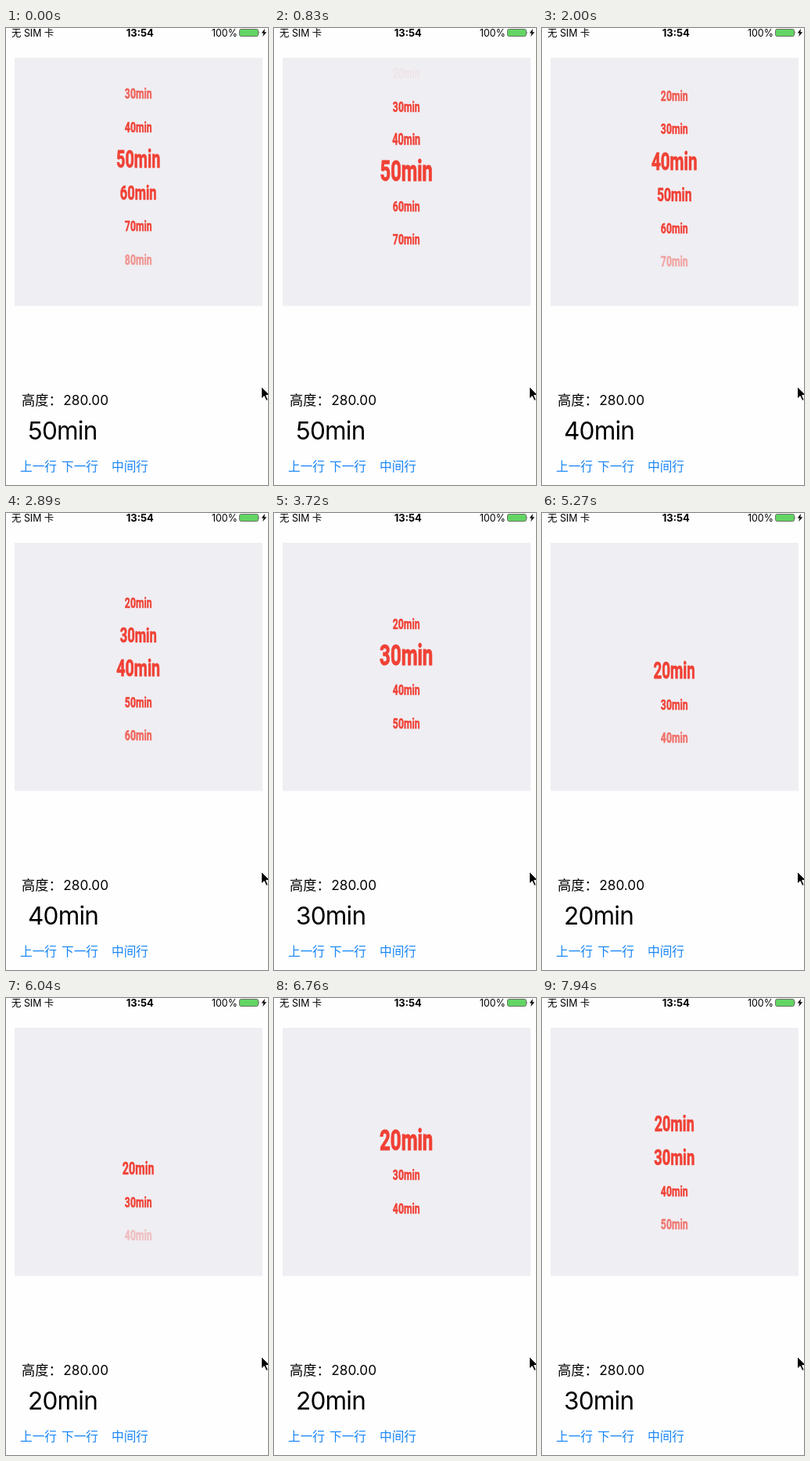
An HTML page for the animation above (8000 ms loop, 335 px wide and 583 px high).

```html
<!DOCTYPE html>
<html lang="zh-CN">
<head>
<meta charset="utf-8">
<title>Duration picker</title>
<style>
  html, body { margin: 0; width: 100%; height: 100%; overflow: hidden; background: #fefefe; }
  svg { display: block; width: 335px; height: 583px; font-family: Inter, "Noto Sans CJK SC", sans-serif; }
  #rows { fill: #f04135; stroke: #f04135; stroke-width: .5; font: 700 18.8px Roboto, sans-serif; text-anchor: middle; }
  #value { font-size: 31.5px; letter-spacing: -.025em; }
  .status { font-size: 12.4px; }
  .clock { font-size: 13px; font-weight: 700; text-anchor: middle; }
  .info { font-size: 17.2px; }
  .link { font-size: 15.7px; fill: #1584f7; }
</style>
</head>
<body>
<svg viewBox="0 0 335 583">
  <g class="status">
    <text x="7" y="10.5">无 SIM 卡</text>
    <text class="clock" x="171.3" y="10.7">13:54</text>
    <text x="295.8" y="10.5" text-anchor="end">100%</text>
  </g>
  <rect x="298.5" y="1.5" width="24" height="9" rx="2" fill="#63d563" stroke="#555" stroke-width=".8"/>
  <path d="M323.6 4.3q1.6 1.7 0 3.4z" fill="#555"/>
  <path d="M331 1l-4.3 5.6h2.7l-1.2 4.4 5-5.8h-2.8z"/>
  <rect x="11" y="38" width="317" height="316.5" fill="#efeef3"/>
  <g id="rows"></g>
  <g class="info">
    <text x="20" y="481">高度：</text>
    <text x="73.3" y="481">280.00</text>
  </g>
  <text id="value" x="28" y="524.5"></text>
  <g class="link">
    <text x="18" y="564.5">上一行</text>
    <text x="71" y="564.5">下一行</text>
    <text x="135" y="564.5">中间行</text>
  </g>
  <path d="M326.5 457.5v15.5l3.6-3.3 2.7 5.8 2.4-1.1-2.6-5.7h5z" stroke="#fff"/>
</svg>
<script>
const LOOP = 8000, GAP = 42.3, CENTRE = 183.2, COUNT = 10;
const CONDENSE = 0.65; // narrow letterforms, the same for every row

const linear = u => u;
const easeOut = u => 1 - (1 - u) ** 2;

// First row's y: dragged past the end, springs back, rests, dragged up again.
const path = [
  [0, 41.2], [830, 57.6], [2000, 86.2], [3010, 118], [3720, 141], [4380, 178], [5270, 202],
  [6040, 218], [6760, CENTRE, easeOut], [7420, CENTRE], [7940, 161.4], [LOOP, 161.4]];

const clamp = v => Math.max(0, Math.min(1, v));
const name = i => 20 + 10 * i + "min";

const value = document.getElementById("value");
const rows = Array.from({ length: COUNT }, (_, i) => {
  const row = document.createElementNS("http://www.w3.org/2000/svg", "text");
  row.textContent = name(i);
  return document.getElementById("rows").appendChild(row);
});

function firstRow(t) {
  const i = path.findIndex(key => key[0] > t);
  const [t0, y0] = path[i - 1], [t1, y1, ease = linear] = path[i];
  return y0 + (y1 - y0) * ease((t - t0) / (t1 - t0));
}

function draw(now) {
  const top = firstRow(now % LOOP);
  rows.forEach((row, i) => {
    const y = top + i * GAP, far = Math.abs(y - CENTRE) / GAP;
    const scale = 1 + 0.97 * clamp(1 - far);
    const lift = 2.2 * (scale - 1);
    row.setAttribute("transform",
      `translate(169.2 ${y - lift}) scale(${scale * CONDENSE} ${scale}) translate(0 6.7)`);
    row.setAttribute("opacity", 1 - clamp(far - 2) ** 1.6);
  });
  value.textContent = name(Math.max(0, Math.round((CENTRE - top) / GAP)));
  requestAnimationFrame(draw);
}
requestAnimationFrame(draw);
</script>
</body>
</html>
```
